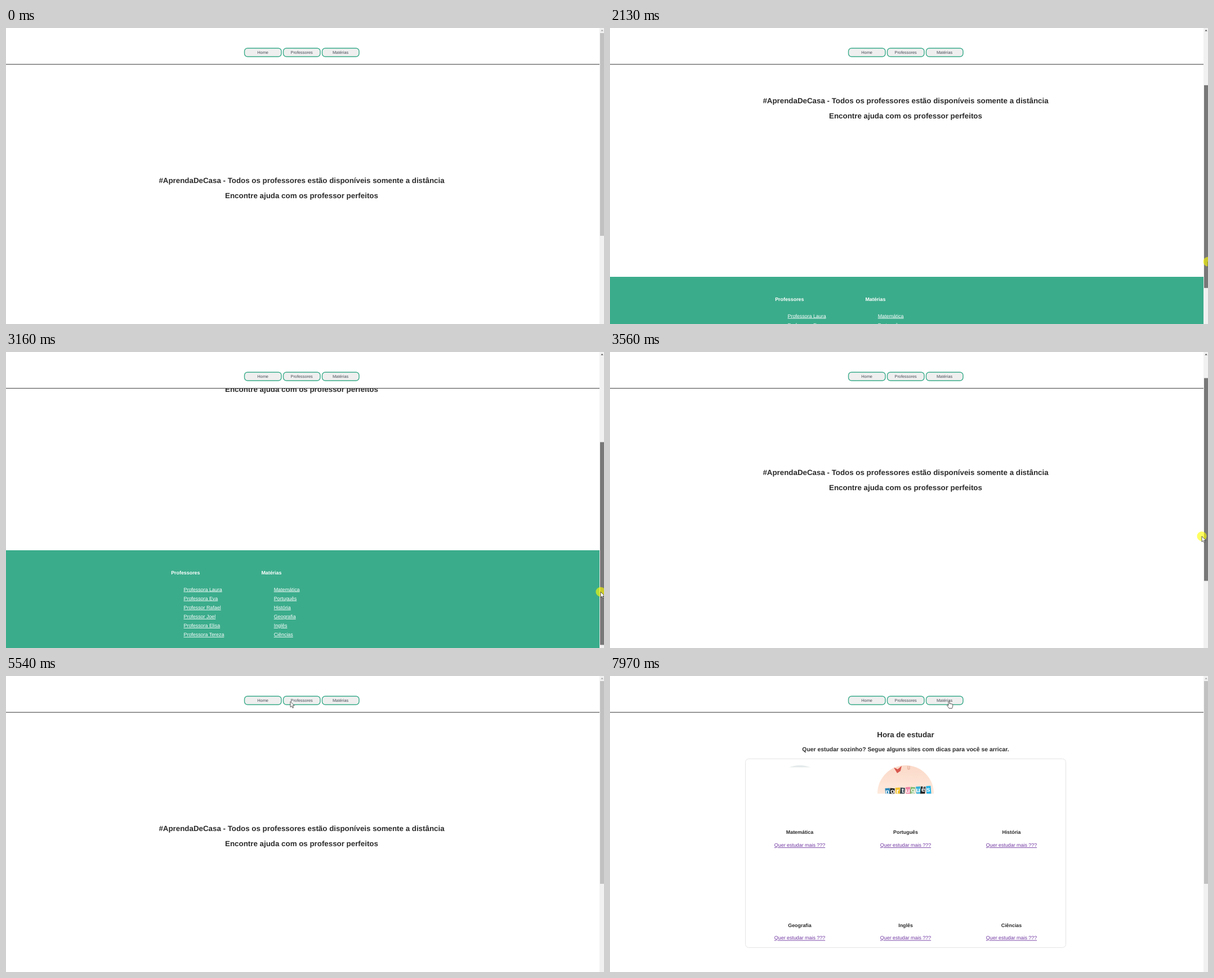
An HTML page for the animation above (8 s loop, 1062x527 px).

```html
<!DOCTYPE html>
<html lang="pt">
<head>
<meta charset="utf-8">
<title>Aulas</title>
<style>
  html, body { margin: 0; width: 100%; height: 100%; overflow: hidden; background: #fff; }
  svg { display: block; font-family: "Liberation Sans", Arial, sans-serif; font-size: 8.89px; fill: #2b2b2b; text-rendering: geometricPrecision; }
  .mid { text-anchor: middle; }
  .bold, .big, .sub { font-weight: bold; }
  .big { font-size: 13.33px; }
  .sub { font-size: 10.4px; }
  .foot { fill: #fff; }
  .link { text-decoration: underline; }
  .seen { fill: #6f35a0; }
  .btn { fill: #efefef; stroke: #3bac8b; stroke-width: 1.4; }
  .label { font-size: 7.35px; fill: #444c55; }
  .card { fill: none; stroke: #e4e4e4; }
  .cursor path { fill: #fff; stroke: #333; stroke-width: .8; stroke-linejoin: round; }
</style>
</head>
<body>
<svg width="1062" height="527" viewBox="0 0 1062 527">
  <defs>
    <linearGradient id="skin" x2="0" y2="1">
      <stop offset="0" stop-color="#fbd9c8"/><stop offset=".5" stop-color="#fee9dc"/>
    </linearGradient>
    <clipPath id="half"><rect x="475" y="158" width="101" height="51.5"/></clipPath>
    <clipPath id="sliver"><rect x="287" y="158" width="100" height="4.5"/></clipPath>
  </defs>

  <g id="home">
    <text class="mid big" x="525" y="276">#AprendaDeCasa - Todos os professores estão disponíveis somente a distância</text>
    <text class="mid big" x="525" y="303.3">Encontre ajuda com os professor perfeitos</text>
    <g id="footer" class="foot" transform="translate(0 585.5)">
      <rect width="1054" height="200" fill="#3bac8b"/>
    </g>
  </g>

  <g id="teachers">
    <text class="mid big" x="525" y="109">Professores</text>
    <rect class="card" x="240.5" y="147.5" width="569" height="374" rx="6"/>
  </g>

  <g id="subjects">
    <text class="mid big" x="525" y="109">Hora de estudar</text>
    <text class="mid sub" x="525" y="134">Quer estudar sozinho? Segue alguns sites com dicas para você se arricar.</text>
    <rect class="card" x="240.5" y="147.5" width="569" height="336" rx="6"/>
    <circle cx="337" cy="209" r="50" fill="#e3e9ea" clip-path="url(#sliver)"/>
    <g id="photo" clip-path="url(#half)">
      <circle cx="525" cy="209" r="50" fill="url(#skin)"/>
      <path d="M504 163l7 3 7-6-2 9-6 4z" fill="#d8584e"/>
      <path d="M529 160v6h3v-6" fill="none" stroke="#e0a58f"/>
    </g>
  </g>

  <g id="header">
    <rect width="1054" height="64" fill="#fff"/>
    <rect y="64" width="1054" height="1" fill="#555"/>
    <rect y="65" width="1054" height="1.5" opacity=".12"/>
  </g>

  <rect x="1054" width="8" height="527" fill="#f1f1f1"/>
  <path id="up" d="M1056.4 5.6h4.4l-2.2-2.6z"/>
  <rect id="thumb" x="1055" width="7" height="361"/>

  <g id="pointer" class="cursor">
    <circle id="halo" r="8.6" fill="#ff0" fill-opacity=".62"/>
    <path id="arrow" d="M0 0V10L2.3 7.9 4 11.5 5.6 10.8 4 7.3H7.2Z"/>
    <path id="hand" d="M-1 7V1Q0-.8 1 1V5Q2 4 3 5.2 4 4.4 5 5.6 6.6 5 6.7 7V9.5Q6.5 11 5.5 13H0Q-1 11-3.6 8-3.6 6-1 8Z"/>
  </g>
</svg>
<script>
const $ = id => document.getElementById(id);

function add(parent, tag, attrs, text = '') {
  const el = document.createElementNS('http://www.w3.org/2000/svg', tag);
  for (const k in attrs) el.setAttribute(k, attrs[k]);
  el.textContent = text;
  parent.append(el);
}

const teachers = ['Professora Laura', 'Professora Eva', 'Professor Rafael', 'Professor Joel', 'Professora Elisa', 'Professora Tereza'];
const subjects = ['Matemática', 'Português', 'História', 'Geografia', 'Inglês', 'Ciências'];

['Home', 'Professores', 'Matérias'].forEach((name, i) => {
  const x = 423.5 + 69 * i;
  add($('header'), 'rect', { class: 'btn', x, y: 36, width: 65.5, height: 15, rx: 5.5 });
  add($('header'), 'text', { class: 'mid label', x: x + 32.6, y: 46.2 }, name);
});

function footerList(title, names, x) {
  add($('footer'), 'text', { class: 'bold', x, y: 43 }, title);
  names.forEach((name, i) =>
    add($('footer'), 'text', { class: 'link', x: x + 22.3, y: 72.5 + 16.15 * i }, name));
}
footerList('Professores', teachers, 293.2);
footerList('Matérias', subjects, 453.4);

function grid(page, names, rowGap, link) {
  names.forEach((name, i) => {
    const x = 337 + 188 * (i % 3), y = 281.3 + rowGap * Math.floor(i / 3);
    add(page, 'text', { class: 'mid bold', x, y }, name);
    if (link) add(page, 'text', { class: 'mid link seen', x, y: y + 22.9 }, link);
  });
}
grid($('teachers'), teachers, 184);
grid($('subjects'), subjects, 165.2, 'Quer estudar mais ???');

// Cut-out letters on the picture
const tints = ['#2a86b8', '#222', '#f2c230', '#3a4a55', '#ee7fa0', '#7cb96a', '#35b0d8', '#222', '#27b4e6'];
[...'português'].forEach((c, i) => {
  const x = 488.5 + 9.1 * i, y = 200 - .5 * i;
  add($('photo'), 'rect', { x, y, width: 8.2, height: 15, fill: tints[i], transform: `rotate(${i % 2 ? 5 : -4} ${x} ${y})` });
  add($('photo'), 'text', { class: 'mid bold', x: x + 4.1, y: y + 9.5, fill: '#fff', 'font-size': 12 }, c);
});

const LOOP = 8000, STEP = 78;

// time, x, y of the pointer tip
const path = [
  [420, 1056, 503], [650, 1028, 425], [1030, 1042, 315], [1180, 1060, 290], [1260, 1060, 290],
  [1740, 1061, 325], [2130, 1062, 416], [2450, 1060, 450], [2750, 1058, 452], [2980, 1058, 452],
  [3160, 1056, 427], [3560, 1051, 328], [3790, 1049, 290], [3870, 1047, 286], [4540, 641, 131],
  [5240, 483, 57], [5390, 495, 49], [5540, 505, 45.5], [5780, 509, 44.5], [6480, 509, 44.5],
  [6870, 560, 47], [7170, 605.5, 42.5], [7340, 605.5, 42.5], [7600, 602, 44.5], [LOOP, 602, 44.5]
];
// time, page scroll
const scrolls = [[0, 0], [1260, 0], [1500, 8], [1740, 32.5], [2130, 142.5], [2450, 232.5],
  [3160, 232.5], [3560, 57.5], [3710, 12], [3870, 0], [LOOP, 0]];

function at(keys, t) {
  const i = Math.max(1, keys.findIndex(k => k[0] > t));
  const a = keys[i - 1], b = keys[i], p = Math.max(0, (t - a[0]) / (b[0] - a[0]));
  return a.slice(1).map((v, j) => v + (b[j + 1] - v) * p);
}

// The screen refreshes every STEP ms, counted from the latest key
function snap(t) {
  const base = path.reduce((m, k) => k[0] <= t ? k[0] : m, 0);
  return base + Math.floor((t - base) / STEP) * STEP;
}

const show = (id, on) => $(id).style.display = on ? '' : 'none';

function draw(now) {
  const t = now % LOOP, s = snap(t);
  const within = (a, b) => t >= a && t < b;
  const [x, y] = at(path, s), [scroll] = at(scrolls, s);
  const drag = within(1260, 3870);

  show('home', t < 6110);
  show('teachers', within(6110, 7820));
  show('subjects', t >= 7820);
  $('home').setAttribute('transform', `translate(0 ${-scroll})`);

  $('thumb').setAttribute('y', 9 + scroll / 1.535);
  $('thumb').setAttribute('fill', drag ? '#787878' : within(1100, 1260) ? '#a8a8a8' : '#c1c1c1');
  $('up').setAttribute('fill', scroll > 0 ? '#505050' : '#a3a3a3');

  const onText = y < 48 && (x > 505.6 && x < 545 || x > 580 && x < 608);
  const hand = onText && !within(6110, 6410) && !within(7600, 7970);
  show('pointer', t >= 420);
  show('halo', drag || within(5780, 5930) || within(7170, 7340));
  show('hand', hand);
  show('arrow', !hand);
  $('pointer').setAttribute('transform', `translate(${x} ${y})`);
}

let start;
function tick(now) {
  start ??= now;
  draw(Math.max(0, now - start));
  requestAnimationFrame(tick);
}
draw(0);
requestAnimationFrame(tick);
</script>
</body>
</html>
```
